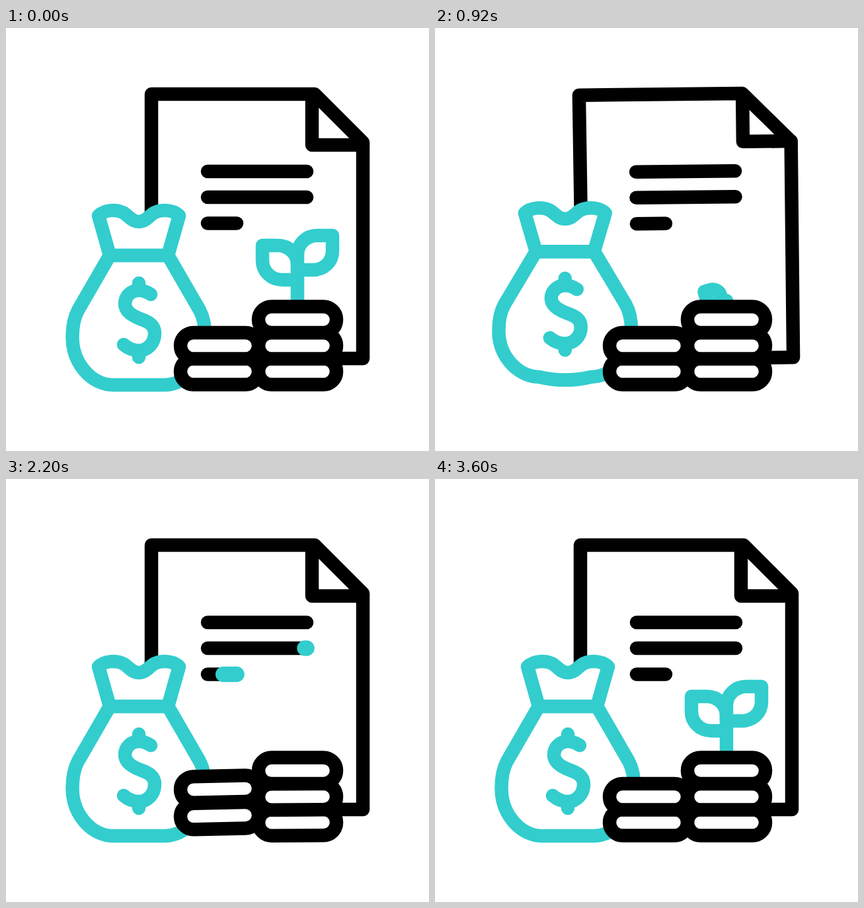
Animation, 640 px wide and 640 px high, one loop 4 s. Source, as an HTML page:

```html
<!DOCTYPE html>
<html lang="en">
<head>
<meta charset="utf-8">
<title>Investment plan</title>
<style>
  html, body { margin: 0; height: 100%; overflow: hidden; background: #fff; }
  svg { display: block; width: 100vw; height: 100vh; }
  path, line, rect {
    fill: none; stroke: #000; stroke-width: 20.5;
    stroke-linecap: round; stroke-linejoin: round;
    vector-effect: non-scaling-stroke;
  }
  .teal { stroke: #33cdcd; }
  .solid { fill: #fff; }
  .sweep { stroke-width: 23.5; }
</style>
</head>
<body>
<svg id="stage" viewBox="0 0 640 640">
  <g id="doc">
    <path id="sheet"/>
    <path id="fold"/>
  </g>
  <g id="plant">
    <path id="stem" class="teal"/>
    <path id="leftLeaf" class="teal" d="M388 329H411C428 329 441 342 441 358V381H418C401 381 388 368 388 352Z"/>
    <path id="rightLeaf" class="teal" d="M494 314H471C454 314 441 327 441 343V366H464C481 366 494 354 494 337Z"/>
  </g>
  <g id="bag">
    <path id="sack" class="teal solid"/>
    <path class="teal solid" d="M140 284C149 275 168 273 180 281C187 286 191 293 201 293C211 293 215 286 222 281C234 273 253 275 262 284L245 344H157Z"/>
    <path class="teal" d="M219 403C213 399 207 397 201 397C189 397 180 406 180 417C180 428 190 435 203 440C217 445 225 450 225 462C225 477 214 488 201 488C193 488 185 485 178 479M201 386V397M201 488V498"/>
  </g>
  <g id="coins"></g>
</svg>
<script>
const $ = id => document.getElementById(id);
const set = (el, attrs) => {
  for (const key in attrs) el.setAttribute(key, attrs[key]);
  return el;
};
const add = (parent, tag, attrs) =>
  parent.appendChild(set(document.createElementNS("http://www.w3.org/2000/svg", tag), attrs));

const ease = u => (1 - Math.cos(Math.PI * Math.min(1, Math.max(0, u)))) / 2;

// Eased value through alternating time, value pairs.
function track(t, ...keys) {
  let value = keys[1];
  for (let i = 2; i < keys.length; i += 2) {
    value += (keys[i + 1] - keys[i - 1]) * ease((t - keys[i - 2]) / (keys[i] - keys[i - 2]));
  }
  return value;
}

const lines = [[217, 455], [256, 455], [295.5, 349]].map(([y, end], i) => {
  add($("doc"), "line", { x1: 305, x2: end, y1: y, y2: y });
  const el = add($("doc"), "line", { class: "teal sweep", y1: y, y2: y });
  return { el, length: end - 305, start: 1000 + 262 * i };
});

const coin = (x, y, start, height, tilt, lag) => ({
  el: add($("coins"), "rect", { class: "solid", x, y, width: 118, height: 39.5, rx: 19.7 }),
  cx: x + 59, cy: y + 20, start, height, tilt, lag
});
const coins = [
  coin(382, 500, 1600, 24, -3.2, 0),
  coin(382, 461, 1600, 28, -3, 0),
  coin(382, 421.5, 1600, 30, -1.5, 60),
  coin(264, 500, 2080, 24, -3.2, 0),
  coin(264, 461, 2080, 28, -3, 0)
];

function drawDocument(t) {
  const angle = track(t, 400, 0, 720, 4.9, 1140, -6.9, 1525, 2.7, 1930, 0);
  const shift = 4.3 * track(t, 400, 0, 950, 1, 1450, 1, 1980, 0);
  set($("doc"), { transform: `rotate(${angle} 380 300)` });
  set($("sheet"), { d: `M${220 - 2 * angle} 330L220 100H467L540 173V500H450` });
  set($("fold"), { d: `M${463 + shift} 102V${177 - shift}H540` });
  for (const { el, length, start } of lines) {
    const head = ease((t - start) / 680);
    const tail = ease((t - start - 320) / 680);
    set(el, {
      x1: 305 + length * tail, x2: 305 + length * head,
      visibility: head > 0 && tail < 1 ? "visible" : "hidden"
    });
  }
}

function drawBag(t) {
  const pose = (rest, squash, hop, leap) =>
    track(t, 0, rest, 200, squash, 460, hop, 730, squash, 1000, leap, 1200, squash, 1740, rest);
  const x = pose(0, -5, -4, -4);
  const y = pose(0, 0, -6.5, -15);
  const bulge = pose(0, 0, 4, 6);
  set($("bag"), {
    transform: `translate(${201 + x} ${540 + y}) scale(${pose(1, 1.075, 1, 0.98)} ${pose(1, 0.86, 0.995, 0.995)}) translate(-201 -540)`
  });
  set($("sack"), {
    d: `M157 344L109 427C102 440 100.500 456 100.500 468C100.500 508 130 540 162 540Q201 ${540 + 2 * bulge} 240 540C272 540 301.500 508 301.500 468C301.500 456 300 440 293 427L245 344Z`
  });
}

function drawPlant(t) {
  const left = track(t, 600, 1, 1180, 0, 2310, 0, 2990, 1.03, 3400, 1);
  const right = track(t, 100, 1, 630, 0, 2620, 0, 3240, 1.045, 3600, 1);
  const grow = (el, size, angle) => set(el, {
    transform: `translate(441 435) rotate(${angle}) scale(${size}) translate(-441 -435)`,
    visibility: size > 0.01 ? "visible" : "hidden"
  });
  grow($("leftLeaf"), left, -28 * Math.max(0, 1 - left));
  grow($("rightLeaf"), right, 0);
  set($("stem"), {
    d: `M441 435V${435 - 54 * left}`,
    visibility: left > 0.01 ? "visible" : "hidden"
  });
}

function drawCoins(t) {
  for (const { el, cx, cy, start, height, tilt, lag } of coins) {
    const lift = track(t, start, 0, start + 270, height, start + 560, 0);
    const angle = track(t, start + lag, 0, start + 270 + lag, tilt, start + 680, 0);
    set(el, { transform: `translate(0 ${-lift}) rotate(${angle} ${cx} ${cy})` });
  }
}

function frame(now) {
  const t = now % 4000;
  drawDocument(t);
  drawPlant(t);
  drawBag(t);
  drawCoins(t);
  requestAnimationFrame(frame);
}
frame(performance.now());
</script>
</body>
</html>
```
